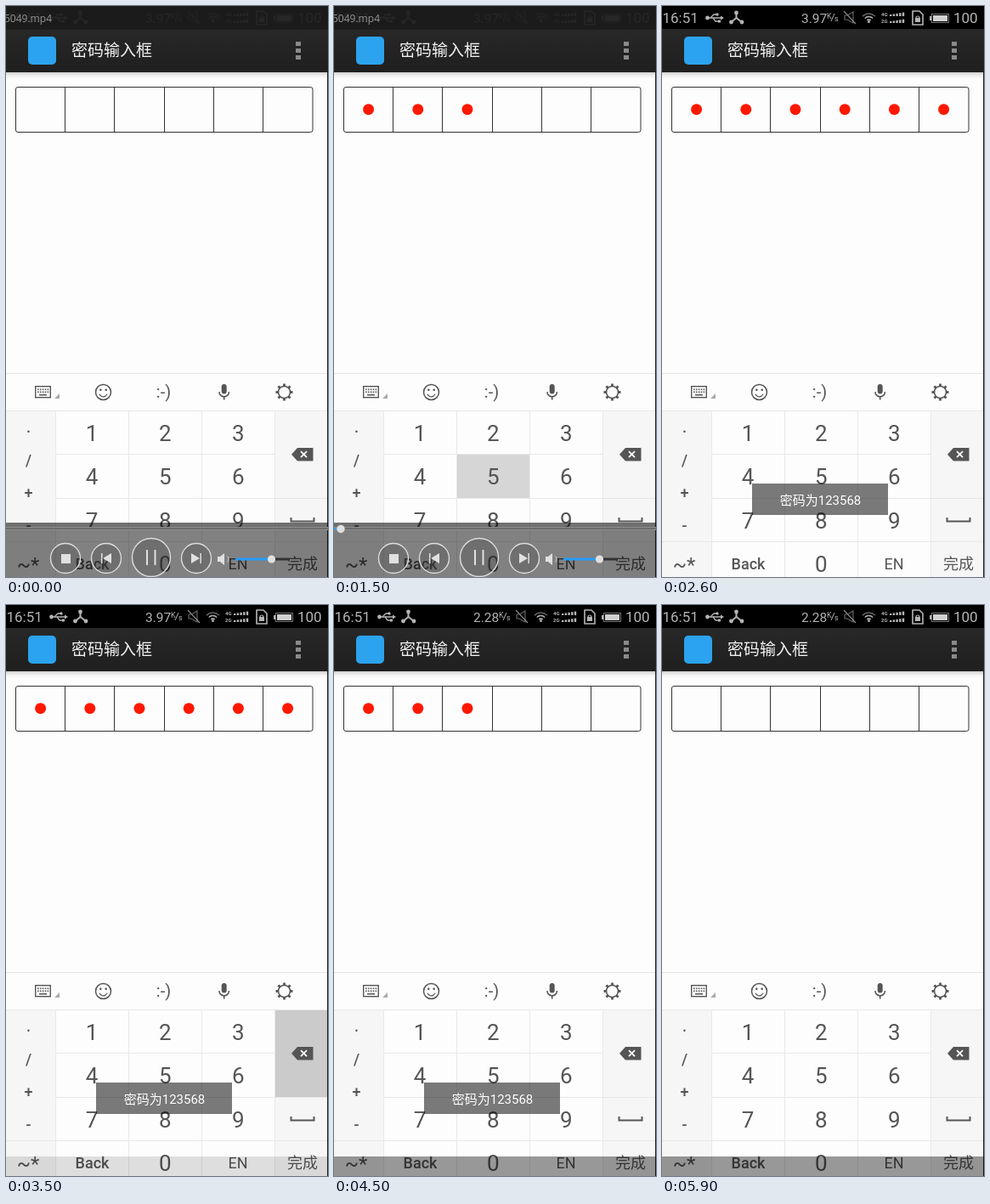
An HTML page with a canvas that plays this animation: 379x672 px, repeating every 6200 ms.

```html
<!DOCTYPE html>
<html lang="zh">
<head>
<meta charset="utf-8">
<title>密码输入框</title>
<style>
html, body { margin: 0; width: 100%; height: 100%; overflow: hidden; background: #fdfdfd; }
canvas { display: block; width: 379px; height: 672px; }
</style>
</head>
<body>
<canvas id="stage" width="379" height="672"></canvas>
<script>
const W = 379, H = 672, LOOP = 6200, STEP = 100;
const ctx = document.getElementById('stage').getContext('2d');
const LATIN = 'Roboto, sans-serif';
const CJK = '"Noto Sans CJK SC", "Noto Sans CJK", sans-serif';
const INK = '#555';

const colX = [59, 145, 231, 317];
const rowY = [477, 528, 580, 631, 683];

// [digit or 'del', pressed at, released at]
const presses = [
  [1, 400, 500], [2, 700, 900], [3, 1000, 1100], [5, 1400, 1600], [6, 1700, 1800], [8, 2100, 2200],
  ['del', 3500, 3600], ['del', 4000, 4100], ['del', 4400, 4500], ['del', 5000, 5100], ['del', 5300, 5400]
];
const LAST_DELETE = 5600;

const ramp = (t, from, to) => Math.min(1, Math.max(0, (t - from) / (to - from)));

function rect(x, y, w, h, color) {
  ctx.fillStyle = color;
  ctx.fillRect(x, y, w, h);
}

function text(str, x, y, font, color = INK, align = 'center') {
  ctx.font = font;
  ctx.fillStyle = color;
  ctx.textAlign = align;
  ctx.textBaseline = 'alphabetic';
  ctx.fillText(str, x, y);
}

function line(points, color, width = 1) {
  ctx.beginPath();
  points.forEach(([x, y]) => ctx.lineTo(x, y));
  ctx.strokeStyle = color;
  ctx.lineWidth = width;
  ctx.stroke();
}

function polygon(points, color) {
  ctx.beginPath();
  points.forEach(([x, y]) => ctx.lineTo(x, y));
  ctx.fillStyle = color;
  ctx.fill();
}

function disc(x, y, r, color) {
  ctx.beginPath();
  ctx.arc(x, y, r, 0, Math.PI * 2);
  ctx.fillStyle = color;
  ctx.fill();
}

function arc(x, y, r, color, width, from = 0, to = Math.PI * 2) {
  ctx.beginPath();
  ctx.arc(x, y, r, from, to);
  ctx.strokeStyle = color;
  ctx.lineWidth = width;
  ctx.stroke();
}

function rounded(x, y, w, h, r) {
  ctx.beginPath();
  ctx.roundRect(x, y, w, h, r);
}

function withAlpha(alpha, draw) {
  if (alpha <= 0) return;
  ctx.save();
  ctx.globalAlpha = alpha;
  draw();
  ctx.restore();
}

function drawStatusBar(t) {
  const c = '#b4b4b4', dim = '#666';
  rect(0, 0, W, 28, '#000');
  text('16:51', 0.5, 20, '17px ' + LATIN, c, 'left');

  // USB
  line([[53, 14], [71, 14]], c, 1.5);
  line([[57, 14], [61, 10], [65, 10]], c, 1.3);
  line([[60, 14], [63, 18], [67, 18]], c, 1.3);
  disc(53.5, 14, 2.4, c);
  disc(65, 10, 1.7, c);
  rect(66, 16.5, 3, 3, c);
  polygon([[69, 11.5], [73, 14], [69, 16.5]], c);

  // three linked nodes
  for (const [x, y] of [[87.5, 8], [81.5, 19], [94, 19]]) {
    line([[87.5, 14], [x, y]], c, 2);
    disc(x, y, 2.4, c);
  }

  text(t < 4200 ? '3.97' : '2.28', 164, 19.5, '15.5px ' + LATIN, c, 'left');
  text('K', 194, 15, '9px ' + LATIN, c, 'left');
  line([[199, 18], [203, 9]], c, 1);
  text('s', 203, 18, '9px ' + LATIN, c, 'left');

  // muted speaker
  line([[215, 11], [218, 11], [225, 7], [225, 20], [218, 16], [215, 16], [215, 11]], dim, 1.2);
  line([[214, 6], [228, 21]], '#888', 1.2);

  // wifi
  [3, 6.5, 10].forEach((r, i) => arc(243.5, 19, r, i < 2 ? c : dim, 1.5, -Math.PI * 0.76, -Math.PI * 0.24));
  disc(243.5, 18.5, 1.5, c);

  // two signal rows
  ['4G', '2G'].forEach((label, row) => {
    const base = 12 + row * 8;
    text(label, 258, base, 'bold 6px ' + LATIN, c, 'left');
    for (let i = 0; i < 5; i++) rect(268 + i * 3.7, base - 2 - i * 0.6, 2.4, 2 + i * 0.6, c);
  });

  // card with a lock
  line([[295, 22], [295, 6], [303, 6], [307, 10], [307, 22], [294.3, 22]], c, 1.6);
  rect(298, 14, 6, 5, c);
  arc(301, 14, 2, c, 1.2, Math.PI, 0);

  // battery
  ctx.strokeStyle = '#777';
  ctx.lineWidth = 1;
  ctx.strokeRect(317.5, 9.5, 20, 10);
  rect(319, 11, 17, 7, '#d0d0d0');
  rect(315, 12, 2, 5, c);
  text('100', 343, 20, '17px ' + LATIN, c, 'left');
}

function drawActionBar() {
  const bar = ctx.createLinearGradient(0, 27, 0, 78);
  bar.addColorStop(0, '#282828');
  bar.addColorStop(1, '#1f1f1f');
  rect(0, 27, W, 51, bar);
  const shadow = ctx.createLinearGradient(0, 78, 0, 86);
  shadow.addColorStop(0, '#cfcfcf');
  shadow.addColorStop(0.5, '#f0f0f0');
  shadow.addColorStop(1, '#fdfdfd');
  rect(0, 78, W, 8, shadow);

  rounded(26, 36, 33, 33, 5);
  ctx.fillStyle = '#2ba3ee';
  ctx.fill();
  text('密码输入框', 77, 59, '19px ' + CJK, '#f4f4f4', 'left');
  for (let i = 0; i < 3; i++) rect(341, 42 + i * 8, 6, 5, '#8a8a8a');
}

function drawPassword(count) {
  const left = 11.5, cell = 58.2;
  rounded(left, 95.5, 349.5, 53, 2.5);
  ctx.strokeStyle = '#333';
  ctx.lineWidth = 1;
  ctx.stroke();
  for (let i = 1; i < 6; i++) {
    const x = Math.floor(left + i * cell) + 0.5;
    line([[x, 95], [x, 149]], '#333');
  }
  for (let i = 0; i < count; i++) disc(left + (i + 0.5) * cell, 121.7, 6.5, '#ff1800');
}

function drawToolbar() {
  line([[0, 432.5], [W, 432.5]], '#e4e4e4');

  // keyboard
  ctx.strokeStyle = INK;
  ctx.lineWidth = 1.4;
  ctx.strokeRect(34.7, 447.7, 17.6, 13);
  for (let row = 0; row < 2; row++)
    for (let i = 0; i < 5; i++) rect(37 + i * 2.9, 450.5 + row * 3, 1.6, 1.6, INK);
  rect(39, 457, 9, 1.5, INK);
  polygon([[63, 456], [63, 462], [57, 462]], '#aaa');

  // smiley
  arc(114.5, 454.5, 9, INK, 1.5);
  disc(111.3, 451.8, 1.3, INK);
  disc(117.7, 451.8, 1.3, INK);
  arc(114.5, 455, 4.8, INK, 1.3, 0.35, Math.PI - 0.35);

  text(':-)', 185.5, 460.5, '20px ' + LATIN);

  // microphone
  rounded(253.7, 445, 6, 11.5, 3);
  ctx.fillStyle = INK;
  ctx.fill();
  arc(256.7, 454, 5.8, INK, 1.5, 0, Math.PI);
  line([[256.7, 459.5], [256.7, 463.5]], INK, 1.7);

  // gear
  arc(327.5, 454.5, 7, INK, 1.6);
  for (let i = 0; i < 8; i++) {
    const a = i * Math.PI / 4, c = Math.cos(a), s = Math.sin(a);
    line([[327.5 + 7 * c, 454.5 + 7 * s], [327.5 + 10 * c, 454.5 + 10 * s]], INK, 2.8);
  }
}

function drawKeys(held) {
  const side = '#f6f6f6', edge = '#e8e8e8';
  rect(0, 477, 59, 195, side);
  rect(317, 477, 62, 195, side);
  if (held === 'del') rect(317, 477, 61, 102, '#cbcbcb');
  else if (held) {
    const col = (held - 1) % 3, row = Math.floor((held - 1) / 3);
    rect(colX[col], rowY[row], 86, rowY[row + 1] - rowY[row], '#d6d6d6');
  }

  line([[0, 476.5], [W, 476.5]], edge);
  line([[59, 527.5], [317, 527.5]], edge);
  line([[59, 579.5], [W, 579.5]], edge);
  line([[0, 630.5], [W, 630.5]], edge);
  colX.forEach(x => line([[x - 0.5, 477], [x - 0.5, H]], edge));

  for (let n = 1; n <= 9; n++)
    text(n, 101 + (n - 1) % 3 * 86.2, 512 + Math.floor((n - 1) / 3) * 51.3, '26px ' + LATIN);
  text('0', 187.2, 666, '26px ' + LATIN);
  ['.', '/', '+', '-'].forEach((mark, i) => text(mark, 26.5, 502 + i * 38.5, '500 18px ' + LATIN));
  text('~*', 26, 666, '24px ' + LATIN);
  text('Back', 101.5, 663, '500 18px ' + LATIN);
  text('EN', 273, 663, '18px ' + LATIN);
  text('完成', 349, 663, '18px ' + CJK);

  // backspace
  polygon([[336, 527.7], [343, 520], [361.5, 520], [361.5, 535.5], [343, 535.5]], INK);
  line([[347, 524.2], [354, 531.2]], '#fff', 1.8);
  line([[354, 524.2], [347, 531.2]], '#fff', 1.8);
  // space
  line([[335.5, 602], [335.5, 606.5], [362.5, 606.5], [362.5, 602]], INK, 2);
}

function drawToast() {
  rect(106, 562, 160, 37, 'rgba(0,0,0,.52)');
  text('密码为123568', 186.5, 586.5, '15px Roboto, ' + CJK, '#fff');
}

function drawButton(x, y, r) {
  disc(x, y, r, 'rgba(70,70,70,.3)');
  arc(x, y, r, '#dcdcdc', 1.4);
}

function drawPlayer(showThumb) {
  const c = '#e0e0e0';
  rect(0, 0, W, 28, 'rgba(29,29,29,.94)');
  text('5049.mp4', 54, 19, '12px "Open Sans", sans-serif', '#969696', 'right');

  rect(0, 608, W, 64, 'rgba(0,0,0,.49)');
  rect(0, 608, W, 5, 'rgba(0,0,0,.12)');
  rect(0, 613, W, 4, '#8c8c8c');
  rect(0, 614, W, 2, '#6c6c6c');
  if (showThumb) {
    rect(0, 614, 8, 2, '#2c9cf0');
    disc(8, 615.5, 4.7, c);
  }

  [70, 118, 224].forEach(x => drawButton(x, 650, 17.5));
  drawButton(171, 649, 22.5);
  rect(65, 645, 11, 11, c);
  polygon([[124, 644], [124, 656], [114, 650]], c);
  rect(112, 644, 1.5, 12, c);
  polygon([[218, 644], [218, 656], [228, 650]], c);
  rect(228.5, 644, 1.5, 12, c);
  rect(165, 640, 2, 18, c);
  rect(174.5, 640, 2, 18, c);

  polygon([[249, 648], [252, 648], [257, 644], [257, 658], [252, 654], [249, 654]], c);
  arc(257, 651, 5, '#bbb', 1.2, -0.8, 0.8);
  rect(270, 649.5, 42, 3, '#259cf5');
  rect(312, 649.5, 21, 3, '#333');
  disc(312.5, 651, 4.6, c);
}

function render(time) {
  const t = Math.floor(time % LOOP / STEP) * STEP;
  const current = presses.find(([, down, up]) => t >= down && t < up);
  const count = presses.reduce(
    (n, [key, , up]) => t < up ? n : n + (key === 'del' ? -1 : 1),
    t >= LAST_DELETE ? -1 : 0
  );

  rect(0, 0, W, H, '#fdfdfd');
  drawStatusBar(t);
  drawActionBar();
  drawPassword(count);
  drawToolbar();
  drawKeys(current && current[0]);
  rect(378, 78, 1, H - 78, '#222');

  withAlpha(Math.min(ramp(t, 2200, 2600), 1 - ramp(t, 5500, 5900)), drawToast);
  if (t >= 3500) rect(0, 649, W, 23, `rgba(0,0,0,${0.12 + 0.28 * ramp(t, 3500, 3800)})`);
  withAlpha(1 - ramp(t, 1500, 1900), () => drawPlayer(t >= 1400));
}

function tick() {
  render(performance.now());
  requestAnimationFrame(tick);
}
tick();
</script>
</body>
</html>
```
